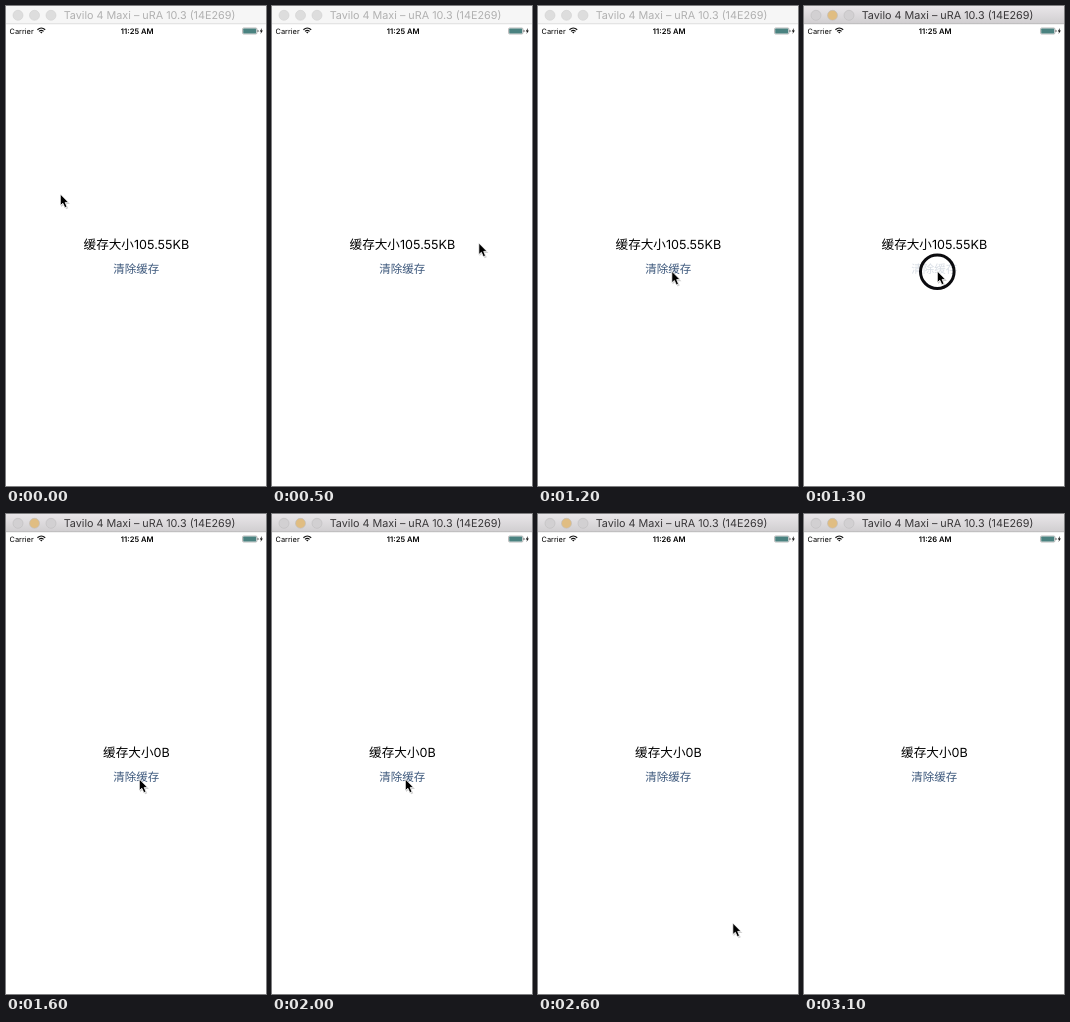
Write an HTML page that moves like this. It is 260 by 480 pixels and loops after 3200 ms.

```html
<!DOCTYPE html>
<html lang="zh-CN">
<head>
<meta charset="utf-8">
<style>
html, body { margin: 0; width: 100%; height: 100%; overflow: hidden; background: #fff; }
svg { display: block; width: 260px; height: 480px; font-family: Inter, "Noto Sans CJK SC", "Noto Sans CJK", sans-serif; text-rendering: geometricPrecision; }
.mid { text-anchor: middle; }
</style>
</head>
<body>
<svg viewBox="0 0 260 480">
  <defs>
    <linearGradient id="active" x2="0" y2="1">
      <stop stop-color="#e9e6e9"/><stop offset="1" stop-color="#d0ced0"/>
    </linearGradient>
  </defs>

  <!-- Window title bar -->
  <rect id="bar" width="260" height="18"/>
  <path id="edge" d="M0 17.75H260" stroke-width=".7"/>
  <g id="lights" stroke-width=".6">
    <circle cx="12" cy="9.3" r="5"/>
    <circle cx="28.5" cy="9.3" r="5"/>
    <circle cx="45" cy="9.3" r="5"/>
  </g>
  <text id="title" class="mid" x="143.5" y="13.3" font-size="10.8">Tavilo 4 Maxi – uRA 10.3 (14E269)</text>

  <!-- Status bar -->
  <text x="3.5" y="27.6" font-size="7.4">Carrier</text>
  <g fill="none" stroke="#111" stroke-width="1.2">
    <path d="M31.4 23.7Q35.3 20.3 39.2 23.7M33 25.4Q35.3 23.4 37.6 25.4"/>
    <path d="M35.3 27.6L34.1 26.3Q35.3 25.3 36.5 26.3Z" fill="#111" stroke="none"/>
  </g>
  <text id="clock" class="mid" x="131.2" y="27.6" font-size="7.6" font-weight="600"></text>
  <rect x="236.5" y="22" width="14.5" height="6" rx="1.2" fill="#fff" stroke="#777" stroke-width=".5"/>
  <rect x="237.2" y="22.6" width="13" height="4.8" rx=".6" fill="#4a8280"/>
  <path d="M251.6 24h.8v2h-.8z" fill="#444"/>
  <path d="M255.9 22L253.7 25.4H255.1L254.5 28L256.9 24.6H255.5Z" fill="#111"/>

  <!-- Page -->
  <text id="size" class="mid" x="130.4" y="243.2" font-size="12.6"></text>
  <text id="button" class="mid" x="130.3" y="267.3" font-size="11.5" fill="#3d587c">清除缓存</text>
  <circle id="ring" cx="133.3" cy="265.8" r="16.8" fill="none" stroke="#0b0b0f" stroke-width="3"/>
  <g id="cursor">
    <path d="M1 1.5V13.5L4 11.2L6.1 15.8L8.3 14.8L6.3 10.5H10Z" fill="#000" opacity=".18"/>
    <path d="M.3 .5V12.1L2.9 9.8L4.8 14.2L7 13.3L5.2 8.9H8.6Z" fill="#000" stroke="#fff" stroke-width=".8"/>
  </g>
</svg>
<script>
const el = id => document.getElementById(id);
const set = (id, attrs) => {
  for (const name in attrs) el(id).setAttribute(name, attrs[name]);
};
const LOOP = 3200, STEP = 100;

// Pointer path: time, x, y
const path = [
  [0, 54, 187.5], [500, 206.5, 236.5], [600, 180, 261], [700, 144, 265],
  [800, 135.5, 265.5], [1300, 133, 264.5], [2200, 133, 264.5],
  [2400, 168, 352], [2600, 194.5, 408.5], [2700, 202, 452]
];

function pointer(t) {
  const i = path.findIndex(p => p[0] > t);
  if (i < 0) return path[path.length - 1].slice(1);
  const [t0, x0, y0] = path[i - 1], [t1, x1, y1] = path[i];
  const k = (t - t0) / (t1 - t0);
  return [x0 + (x1 - x0) * k, y0 + (y1 - y0) * k];
}

function draw(t) {
  const active = t >= 1300, pressed = active && t < 1500;
  set('bar', { fill: active ? 'url(#active)' : '#f6f6f6' });
  set('edge', { stroke: active ? '#b4b2b4' : '#d5d5d5' });
  set('lights', { fill: active ? '#d2d0d2' : '#dddddd', stroke: active ? '#bebcbe' : '#d0d0d0' });
  el('lights').children[1].setAttribute('fill', active ? '#e0bd82' : '#dddddd');
  set('title', { fill: active ? '#383638' : '#b0b0b0' });
  set('button', { opacity: pressed ? 0.2 : 1 });
  set('ring', { opacity: pressed ? 1 : 0 });
  set('cursor', { transform: `translate(${pointer(t)})`, opacity: t < 2800 ? 1 : 0 });
  el('size').textContent = '缓存大小' + (t < 1500 ? '105.55KB' : '0B');
  el('clock').textContent = t < 2300 ? '11:25 AM' : '11:26 AM';
}

const start = performance.now();
function tick() {
  const t = (performance.now() - start) % LOOP;
  draw(Math.floor(t / STEP) * STEP);
  requestAnimationFrame(tick);
}
tick();
</script>
</body>
</html>
```
